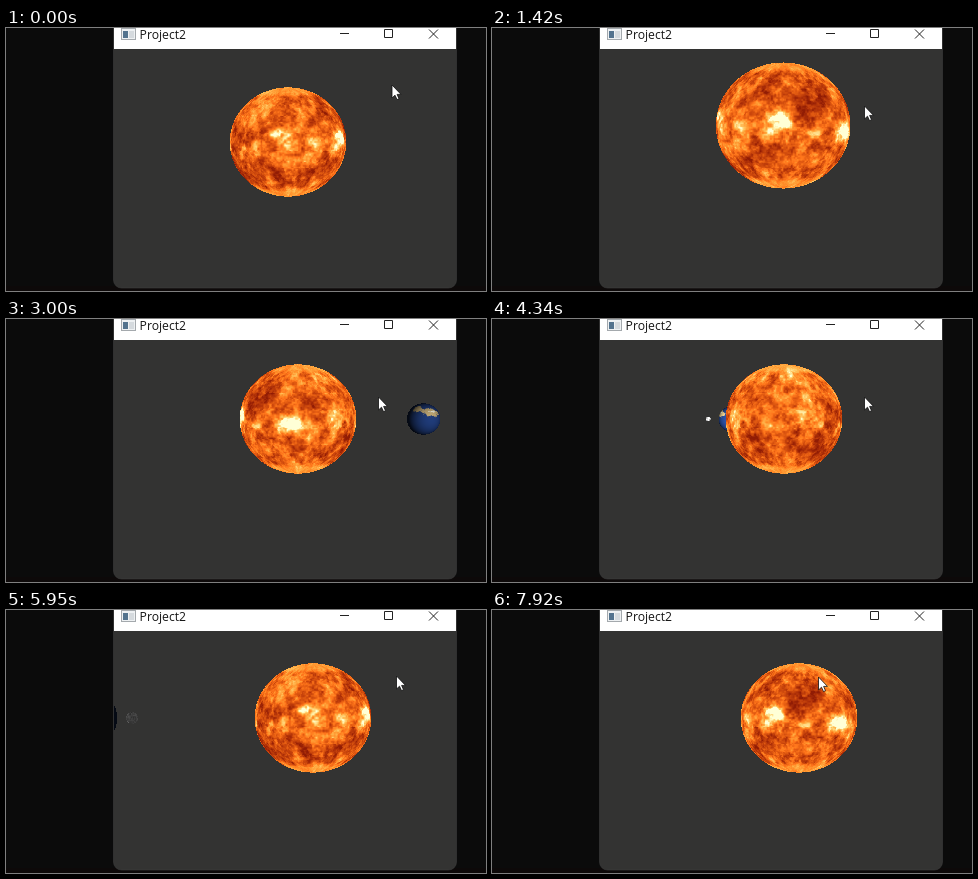
Write an HTML page with a canvas that moves like this. It is 480x263 px and loops after 7990 ms.

```html
<!DOCTYPE html>
<html lang="en">
<head>
<meta charset="utf-8">
<title>Project2</title>
<style>
  html, body { margin: 0; height: 100%; overflow: hidden; background: #0b0b0b; }
  canvas { display: block; width: 100vw; height: 100vh; }
</style>
</head>
<body>
<canvas id="stage" width="480" height="263"></canvas>
<script>
const ctx = document.getElementById('stage').getContext('2d');
const buffer = document.createElement('canvas');
const bufferCtx = buffer.getContext('2d');

const LOOP = 7.99;      // seconds
const RAD = Math.PI / 180;
const ASPECT = 0.937;   // vertical squash of every sphere
const FOCAL = 322;      // pixels per orbit radius at unit depth
const SUN_SIZE = 100.6, EARTH_SIZE = 37.2, MOON_SIZE = 6.6;
const MOON_ORBIT = 0.2;

const clamp = value => Math.max(0, Math.min(1, value));
const ease = k => k * k * (3 - 2 * k);
const ramp = (t, from, to) => ease(clamp((t - from) / (to - from)));
const mix = (a, b, k) => a.map((value, i) => value + (b[i] - value) * k);

function hash(x, y) {
  let n = Math.imul(x, 374761393) + Math.imul(y, 668265263) + 1013;
  n = Math.imul(n ^ (n >>> 13), 1274126177);
  return ((n ^ (n >>> 16)) >>> 0) / 4294967296;
}

// Smooth value noise that wraps around the longitude.
function noise(lon, lat, cells) {
  const x = lon / 360 * cells, y = (lat + 90) / 360 * cells;
  const xi = Math.floor(x), yi = Math.floor(y);
  const fx = ease(x - xi), fy = ease(y - yi);
  const at = (dx, dy) => hash((xi + dx) % cells, yi + dy + cells * 7);
  const top = at(0, 0) + (at(1, 0) - at(0, 0)) * fx;
  const bottom = at(0, 1) + (at(1, 1) - at(0, 1)) * fx;
  return top + (bottom - top) * fy;
}

function fbm(lon, lat, cells) {
  let sum = 0, total = 0;
  for (let i = 0, gain = 1; i < 4; i++, gain *= 0.75) {
    sum += gain * noise(lon, lat, cells << i);
    total += gain;
  }
  return sum / total;
}

function blob(lon, lat, cx, cy, rx, ry) {
  const dx = ((lon - cx + 540) % 360 - 180) / rx, dy = (lat - cy) / ry;
  return Math.exp(-dx * dx - dy * dy);
}

function makeTexture(colorAt) {
  const texture = new Uint8ClampedArray(360 * 180 * 3);
  for (let y = 0; y < 180; y++)
    for (let x = 0; x < 360; x++)
      texture.set(colorAt(x, 89.5 - y), (y * 360 + x) * 3);
  return texture;
}

function heatColor(heat) {
  const k = clamp(heat);
  return [145 + 230 * k, 28 + 150 * k + 80 * k * k, 4 + 30 * k + 180 * k ** 4];
}

const sunTexture = makeTexture((lon, lat) => {
  const grain = fbm(lon, lat, 26);
  const belt = blob(0, lat, 0, -5, 1, 11) * noise(lon, 0, 20);
  const flare = blob(lon, lat, 64, 4, 9, 12) + blob(lon, lat, 129, -5, 12, 8) + blob(lon, lat, 349, 10, 8, 6);
  const bright = blob(lon, lat, 260, 42, 75, 28);
  const dark = blob(lon, lat, 300, -36, 100, 20) + 0.7 * blob(lon, lat, 100, 30, 30, 18);
  const pole = ramp(Math.abs(lat), 52, 66);
  return heatColor(0.38 + (grain - 0.5) * 1.3 * (1 - 0.6 * pole)
    + belt * grain * 0.55 + flare * (0.15 + 0.6 * grain)
    + bright * 0.24 - dark * 0.15 + pole * 0.25);
});

const earthTexture = makeTexture((lon, lat) => {
  const grain = fbm(lon, lat, 16);
  const land = blob(lon, lat, 342, 25, 20, 18) + blob(lon, lat, 35, 54, 25, 12)
    + blob(lon, lat, 212, 25, 38, 20) + blob(lon, lat, 150, 42, 30, 16);
  const cloud = blob(lon, lat, 350, -40, 24, 13) + 0.8 * blob(lon, lat, 215, 28, 25, 6);
  const ground = mix([34, 64, 130], [205, 180, 125], clamp((land + grain - 0.98) * 7));
  return mix(ground, [250, 250, 235], clamp((cloud + grain - 0.95) * 4));
});

const moonTexture = makeTexture((lon, lat) => {
  const tone = 140 + 190 * (fbm(lon, lat, 18) - 0.3);
  return [tone, tone, tone];
});

function drawSphere({ texture, x, y, r, spin, light, ambient }) {
  const ry = r * ASPECT;
  if (x + r < 108 || x - r > 450) return;
  const left = Math.floor(x - r), top = Math.floor(y - ry);
  const width = Math.ceil(2 * r) + 2, height = Math.ceil(2 * ry) + 2;
  buffer.width = width;
  buffer.height = height;
  const image = bufferCtx.createImageData(width, height);
  for (let py = 0; py < height; py++) {
    const v = (y - top - py - 0.5) / ry;
    if (Math.abs(v) >= 1) continue;
    const row = Math.floor(90 - Math.asin(v) / RAD);
    for (let px = 0; px < width; px++) {
      const u = (left + px + 0.5 - x) / r;
      const depth = 1 - u * u - v * v;
      if (depth <= 0) continue;
      const w = Math.sqrt(depth);
      const lon = Math.floor(Math.atan2(u, w) / RAD + spin + 720) % 360;
      const source = (row * 360 + lon) * 3, target = (py * width + px) * 4;
      const shade = light ? ambient + 1.4 * Math.max(0, u * light[0] + w * light[1]) : 1;
      for (let c = 0; c < 3; c++) image.data[target + c] = texture[source + c] * shade;
      image.data[target + 3] = 255;
    }
  }
  bufferCtx.putImageData(image, 0, 0);
  ctx.drawImage(buffer, left, top);
}

function rect(color, x, y, w, h) {
  ctx.fillStyle = color;
  ctx.fillRect(x, y, w, h);
}

function drawWindow() {
  rect('#0b0b0b', 0, 0, 480, 263);
  rect('#0d0909', 0, 258, 480, 5);
  ctx.beginPath();
  ctx.roundRect(107.5, -10, 343, 270, 8);
  ctx.fillStyle = '#333332';
  ctx.fill();
  ctx.strokeStyle = '#3d3d3d';
  ctx.lineWidth = 0.6;
  ctx.stroke();
  rect('#fff', 108, 0, 342, 21);

  rect('#a4a9ad', 115, 0, 15, 12);
  rect('#eef1f3', 116, 1, 13, 10);
  rect('#53738e', 117, 3, 5, 7);
  rect('#d5dade', 123, 3, 5, 7);

  ctx.fillStyle = '#151515';
  ctx.font = '12.2px "Open Sans", "Noto Sans", sans-serif';
  ctx.fillText('Project2', 133.6, 11);

  ctx.strokeStyle = '#222';
  ctx.lineWidth = 1;
  ctx.stroke(new Path2D('M334 5.5H343M423 1.5L432 10.5M432 1.5L423 10.5M378.5 1.5H386.5V9.5H378.5Z'));
}

function drawCursor(t) {
  const aside = ramp(t, 1, 1.4), back = ramp(t, 5, 5.65), over = ramp(t, 6.3, 7.85);
  ctx.save();
  ctx.translate(386 - 13.5 * aside + 18 * back - 64 * over, 57 + 21 * aside - 12 * back + over);
  const arrow = new Path2D('M0 0V13L3 10.2L5 14.6L7 13.7L5.1 9.4H9Z');
  ctx.fillStyle = '#fff';
  ctx.fill(arrow);
  ctx.strokeStyle = '#111';
  ctx.lineWidth = 0.8;
  ctx.stroke(arrow);
  ctx.restore();
}

// The view zooms in twice, slides right, then sways up and down.
function cameraAt(t) {
  const zoomIn = ramp(t, 1.15, 1.56);
  const zoom = zoomIn - ramp(t, 2.5, 2.9) + 0.8 * (ramp(t, 3.28, 3.6) - ramp(t, 3.6, 4));
  const settle = ramp(t, 5.2, 5.8);
  const sway = 7 * Math.sin(Math.max(0, t - 5.95) / 1.97 * 4 * Math.PI);
  return {
    x: 282 + 10 * zoomIn + 2.5 * zoom + 19 * ramp(t, 4.4, 4.9) - 4 * settle,
    y: 114 - 14 * zoomIn - 8.5 * zoom + 8 * settle - sway,
    distance: SUN_SIZE / (58.3 + 12.2 * zoom)
  };
}

function drawPlanets(t) {
  const camera = cameraAt(t);
  const surge = clamp((t - 3) / 2.95);  // everything turns faster for a while
  const orbit = (56.6 * t - 50 + 20 * surge) * RAD;
  const moonAngle = (73 * t - 38 + 40 * surge) * RAD;
  const side = Math.sin(orbit), front = Math.cos(orbit);
  const light = [0.3 * side, -front];

  const place = (side, front, size) => {
    const depth = camera.distance - front;
    return { x: camera.x + FOCAL * side / depth, y: camera.y, r: size / depth, depth };
  };
  const sun = { ...place(0, 0, SUN_SIZE), texture: sunTexture, spin: 47 * t + 77 * surge };
  const earth = {
    ...place(side, front, EARTH_SIZE),
    texture: earthTexture, spin: 80 * (t - 0.74), light, ambient: 0.15
  };
  const moon = {
    ...place(side + MOON_ORBIT * Math.sin(moonAngle), front + MOON_ORBIT * Math.cos(moonAngle), MOON_SIZE),
    texture: moonTexture, spin: 50 * t, light, ambient: 0.34
  };

  ctx.save();
  ctx.beginPath();
  ctx.rect(108, 21, 342, 239);
  ctx.clip();
  [sun, earth, moon].sort((a, b) => b.depth - a.depth).forEach(drawSphere);
  ctx.restore();
}

const start = performance.now();
function frame() {
  const t = (performance.now() - start) / 1000 % LOOP;
  drawWindow();
  drawPlanets(t);
  drawCursor(t);
  requestAnimationFrame(frame);
}
frame();
</script>
</body>
</html>
```
